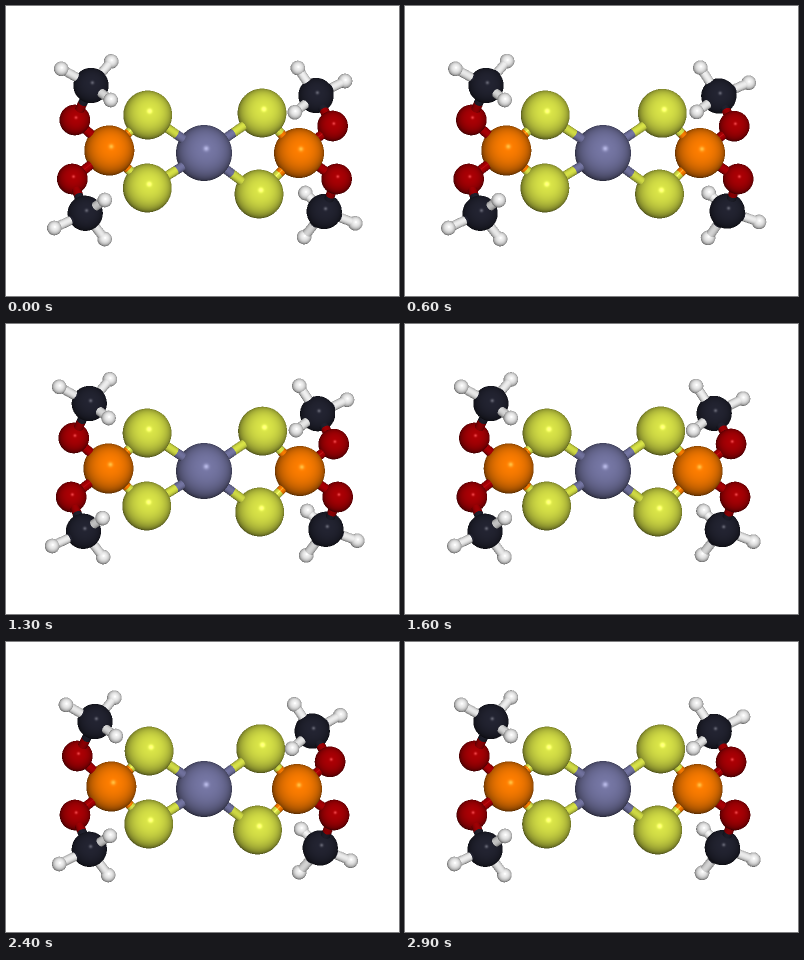
Write an HTML page with a canvas that moves like this. It is 393x290 px and loops after 3000 ms.

```html
<!DOCTYPE html>
<html lang="en">
<head>
<meta charset="utf-8">
<title>Rocking molecule</title>
<style>
  html, body { margin: 0; width: 100%; height: 100%; overflow: hidden; background: #fff; }
  canvas { display: block; width: 393px; height: 290px; }
</style>
</head>
<body>
<canvas id="stage" width="393" height="290"></canvas>
<script>
const WIDTH = 393, HEIGHT = 290, SCALE = 2;
const LOOP = 3000, STEP = 100;
const SWING = 0.053;      // rocking amplitude in radians
const STICK = 4.7;

const ELEMENTS = {
  Zn: { radius: 28, color: [118, 119, 165] },
  S: { radius: 24.4, color: [219, 230, 72] },
  P: { radius: 25, color: [255, 126, 0] },
  O: { radius: 15.3, color: [172, 0, 4] },
  C: { radius: 17.6, color: [35, 36, 50] },
  H: { radius: 7.3, color: [245, 245, 245] }
};

// Each atom: x, y, sideways swing, vertical swing
const LAYOUT = {
  Zn: [[198, 147, 0, 0]],
  S: [[141.7, 109, -1.5, 0], [141.3, 182, -1.5, 0], [256, 107, 1.4, 0.3], [253, 188, 1.6, 0]],
  P: [[103.3, 144.5, -2.1, 0], [293, 147, 2.1, 0]],
  O: [[68.8, 114, -2.6, 0], [66.3, 173, -2.8, 0], [326.6, 120, 2.7, 0.2], [330.6, 173, 2.7, 0]],
  C: [[85, 79.5, -4.2, 0], [79.2, 207.3, -4.3, 0], [310, 89.5, 4, 0.5], [318.2, 205.5, 4.2, -0.5]],
  H: [
    [55.2, 62.8, -5, 0], [105.2, 55.4, -3.3, -0.3], [104.7, 94, -5.3, 0],
    [98.8, 194, -5.4, 0.2], [48.3, 222, -5.2, 0], [98.6, 233, -3.7, 0],
    [291.8, 62, 3.7, -0.4], [339, 75, 4.9, 1.8], [288.8, 106.3, 3, -0.4],
    [299.4, 187, 4.5, 0], [349.3, 217.3, 4.9, -1.5], [298.1, 231, 5.2, 0.9]
  ]
};

const atoms = Object.entries(LAYOUT).flatMap(([kind, rows]) =>
  rows.map(([x, y, dx, dy]) => ({ ...ELEMENTS[kind], kind, x, y, dx, dy, z: -dx / SWING })));
const group = kind => atoms.filter(atom => atom.kind === kind);
const [zinc] = group("Zn");
const sulfurs = group("S"), phosphors = group("P"), oxygens = group("O"), carbons = group("C");

const bonds = [
  ...sulfurs.flatMap((s, i) => [[zinc, s], [s, phosphors[i >> 1]]]),
  ...oxygens.flatMap((o, i) => [[phosphors[i >> 1], o], [o, carbons[i]]]),
  ...group("H").map((h, i) => [carbons[Math.floor(i / 3)], h])
];

const stage = document.getElementById("stage").getContext("2d");
const buffer = document.createElement("canvas");
buffer.width = WIDTH * SCALE;
buffer.height = HEIGHT * SCALE;
const bufferCtx = buffer.getContext("2d");
const image = bufferCtx.createImageData(buffer.width, buffer.height);
const depth = new Float32Array(buffer.width * buffer.height);

const LIGHT = [0.08, -0.16, 0.984];

function plot(index, z, color, nx, ny, nz) {
  if (z <= depth[index]) return;
  depth[index] = z;
  const facing = Math.max(0, nx * LIGHT[0] + ny * LIGHT[1] + nz * LIGHT[2]);
  const level = 0.36 + 0.64 * Math.pow(facing, 0.9);
  const shine = 65 * Math.pow(facing, 220);
  for (let c = 0; c < 3; c++) image.data[index * 4 + c] = color[c] * level + shine;
}

function scan(left, top, right, bottom, visit) {
  const clamp = (v, max) => Math.min(max, Math.max(0, Math.floor(v * SCALE)));
  const x1 = clamp(right, buffer.width - 1), y1 = clamp(bottom, buffer.height - 1);
  for (let y = clamp(top, y1); y <= y1; y++) {
    for (let x = clamp(left, x1); x <= x1; x++) {
      visit((x + 0.5) / SCALE, (y + 0.5) / SCALE, y * buffer.width + x);
    }
  }
}

function drawSphere({ px, py, z, radius: r, color }) {
  scan(px - r, py - r, px + r, py + r, (x, y, index) => {
    const dx = x - px, dy = y - py, rest = r * r - dx * dx - dy * dy;
    if (rest < 0) return;
    const h = Math.sqrt(rest);
    plot(index, z + h, color, dx / r, dy / r, h / r);
  });
}

function drawBond([a, b]) {
  const vx = b.px - a.px, vy = b.py - a.py, vz = b.z - a.z;
  const length = Math.hypot(vx, vy, vz);
  const ux = vx / length, uy = vy / length, uz = vz / length;
  const flat = 1 - uz * uz;
  scan(Math.min(a.px, b.px) - STICK, Math.min(a.py, b.py) - STICK,
    Math.max(a.px, b.px) + STICK, Math.max(a.py, b.py) + STICK, (x, y, index) => {
      const wx = x - a.px, wy = y - a.py;
      const k = wx * ux + wy * uy;
      const root = k * k * uz * uz - flat * (wx * wx + wy * wy - k * k - STICK * STICK);
      if (root < 0) return;
      const h = (k * uz + Math.sqrt(root)) / flat;
      const along = k + h * uz;
      if (along < 0 || along > length) return;
      plot(index, a.z + h, along < length / 2 ? a.color : b.color,
        (wx - along * ux) / STICK, (wy - along * uy) / STICK, (h - along * uz) / STICK);
    });
}

function render(time) {
  const swing = Math.sin(2 * Math.PI * time / LOOP);
  for (const atom of atoms) {
    atom.px = atom.x + atom.dx * swing;
    atom.py = atom.y + atom.dy * swing;
  }
  image.data.fill(255);
  depth.fill(-1e6);
  bonds.forEach(drawBond);
  atoms.forEach(drawSphere);
  bufferCtx.putImageData(image, 0, 0);
  stage.drawImage(buffer, 0, 0, WIDTH, HEIGHT);
}

let shown = -1;
const start = performance.now();
function tick() {
  const elapsed = Math.max(0, performance.now() - start) % LOOP;
  const time = Math.floor(elapsed / STEP) * STEP;
  if (time !== shown) render(shown = time);
  requestAnimationFrame(tick);
}
tick();
</script>
</body>
</html>
```
